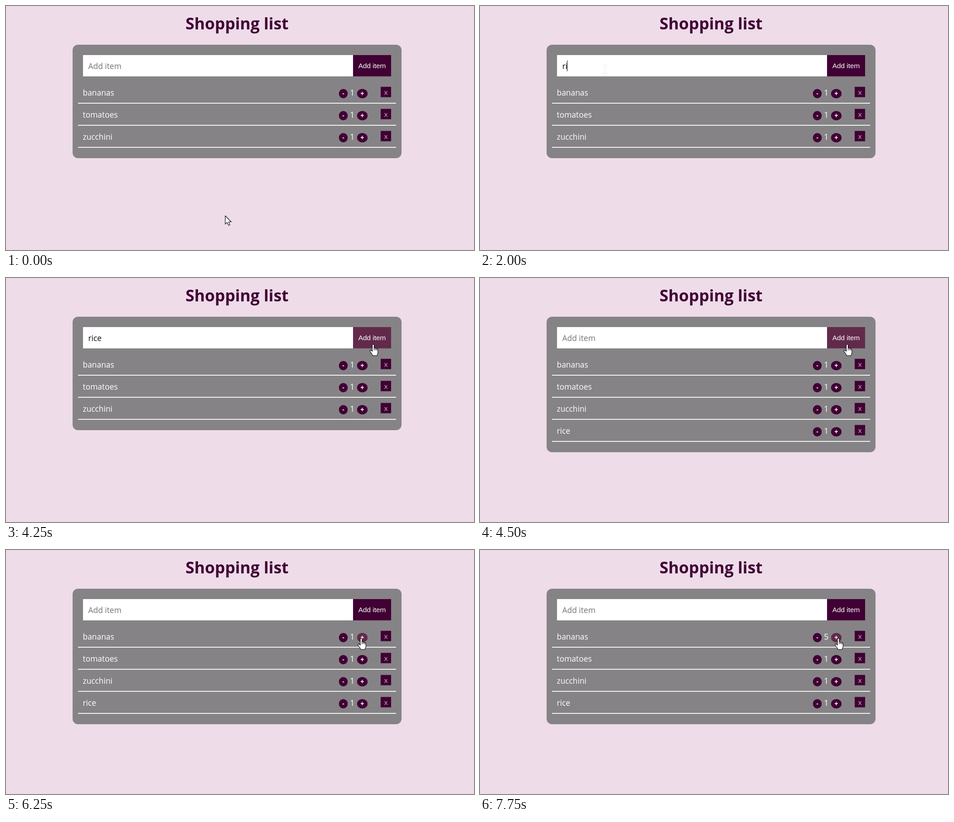
Recreate the animation shown at these times as an HTML page. Size 1033 by 542 pixels, loop 8000 ms.

```html
<!DOCTYPE html>
<html lang="en">
<head>
<meta charset="utf-8">
<title>Shopping list</title>
<style>
  html, body { margin: 0; width: 100%; height: 100%; overflow: hidden; background: #eedce9; }
  svg { display: block; width: 1033px; height: 542px; }
  text { font: 17.4px "Open Sans", "Noto Sans", sans-serif; fill: #fff; }
  .title { font-size: 35.4px; font-weight: 700; fill: #400034; }
  .button { font: 15.36px "Liberation Sans", Arial, sans-serif; }
  .sign { font: bold 14px "Liberation Sans", Arial, sans-serif; }
  .mid { text-anchor: middle; }
  .dark { fill: #400034; }
  .hover { fill: #622a4a; }
  .cross { fill: #c8b4c3; }
  .cursor { fill: #fff; stroke: #000; stroke-width: 1.1; stroke-linejoin: round; }
</style>
</head>
<body>
<svg viewBox="0 0 1033 542">
  <text class="title mid" x="510" y="52">Shopping list</text>
  <rect id="card" x="147" y="86" width="726" rx="12" fill="#868386"/>
  <rect x="170" y="109" width="596" height="47.3" fill="#fff"/>
  <text id="field" x="181.5" y="140"></text>
  <rect id="caret" y="121" width="1" height="24" fill="#000"/>
  <rect id="add" x="766" y="109" width="84" height="47.3"/>
  <text class="button mid" x="808" y="138">Add item</text>
  <g id="rows"></g>
  <g id="arrow" class="cursor">
    <path d="M0 0V18.6L4.3 14.6L7.2 21.2L10.2 19.9L7.4 13.5H13.2Z"/>
  </g>
  <g id="hand" class="cursor">
    <path d="M-2 2Q-2 0 0 0Q2 0 2 2V8Q4.6 7.2 5 9Q7.4 8.3 8 10Q10.4 9.6 10.4 12V18Q10.4 21 8 25H-1Q-2.5 21 -5.4 17.5Q-8.4 13.6 -6.6 12.8Q-4.6 12 -2 15.4Z"/>
    <path d="M2 8V13M5 9V13M8 10V13.5" fill="none"/>
  </g>
  <g id="beam" fill="none" stroke="#eeeeee" stroke-width="1.3">
    <path d="M-5 -9H-1.5L0 -8L1.5 -9H5M0 -8V8M-5 9.5H-1.5L0 8L1.5 9.5H5"/>
  </g>
</svg>
<script>
const LOOP = 8000;
const ROW = 49;
const $ = id => document.getElementById(id);

// Each step: time in ms and what changes then.
const steps = [
  [0, { cursor: ["arrow", 484, 466], text: "", caret: 0, items: 3, count: 1, hover: "" }],
  [250, { cursor: ["arrow", 424, 371] }],
  [500, { cursor: ["arrow", 259, 161] }],
  [750, { cursor: ["beam", 276, 140.5] }],
  [1250, { caret: 182 }],
  [1750, { text: "r", caret: 188 }],
  [2000, { text: "ri", caret: 192 }],
  [2500, { text: "rice", caret: 211 }],
  [3250, { caret: 0, cursor: ["beam", 390, 140] }],
  [3500, { cursor: ["beam", 600, 136] }],
  [3750, { caret: 211, cursor: ["hand", 800, 139], hover: "add" }],
  [4000, { cursor: ["hand", 813, 151] }],
  [4250, { caret: 0, cursor: ["hand", 810.5, 147.5] }],
  [4500, { text: "", items: 4 }],
  [5000, { cursor: ["arrow", 757, 182], hover: "" }],
  [5250, { cursor: ["arrow", 701, 208.5] }],
  [5500, { cursor: ["arrow", 727, 220] }],
  [5750, { cursor: ["arrow", 762, 214] }],
  [6000, { cursor: ["arrow", 778, 206] }],
  [6250, { cursor: ["hand", 784, 196], hover: "plus0" }],
  [6500, { count: 2 }],
  [6750, { count: 3 }],
  [7000, { count: 4 }],
  [7250, { count: 5, cursor: ["hand", 791, 196] }]
];

function rowMarkup(name, i) {
  return `<g id="row${i}" transform="translate(0 ${i * ROW})">
    <text x="169.5" y="199">${name}</text>
    <ellipse class="dark" cx="744.5" cy="194.7" rx="9.7" ry="10.4"/>
    <text class="sign mid" x="744.5" y="199">-</text>
    <text id="count${i}" class="mid" x="764.3" y="199">1</text>
    <ellipse id="plus${i}" class="dark" cx="786.5" cy="194.7" rx="11.6" ry="10.4"/>
    <text class="sign mid" x="786.3" y="199">+</text>
    <rect class="dark" x="827" y="179.5" width="23" height="23"/>
    <text class="button cross mid" x="838.5" y="196.5">x</text>
    <rect x="159" y="215" width="702" height="1.8" fill="#fff"/>
  </g>`;
}

$("rows").innerHTML = ["bananas", "tomatoes", "zucchini", "rice"].map(rowMarkup).join("");

function show(el, on) {
  el.style.display = on ? "" : "none";
}

function stateAt(t) {
  return Object.assign({}, ...steps.filter(([at]) => at <= t).map(([, change]) => change));
}

function draw(t) {
  const s = stateAt(t);
  const [kind, x, y] = s.cursor;

  $("field").textContent = s.text || "Add item";
  $("field").style.fill = s.text ? "#111" : "#757575";
  show($("caret"), s.caret);
  $("caret").setAttribute("x", s.caret);

  $("card").setAttribute("height", 105 + s.items * ROW);
  show($("row3"), s.items > 3);
  $("count0").textContent = s.count;

  for (const id of ["add", "plus0"])
    $(id).setAttribute("class", s.hover === id ? "hover" : "dark");

  for (const id of ["arrow", "hand", "beam"]) show($(id), id === kind);
  $(kind).setAttribute("transform", `translate(${x} ${y})`);
}

const start = performance.now();
function tick() {
  draw((performance.now() - start) % LOOP);
  requestAnimationFrame(tick);
}
tick();
</script>
</body>
</html>
```
